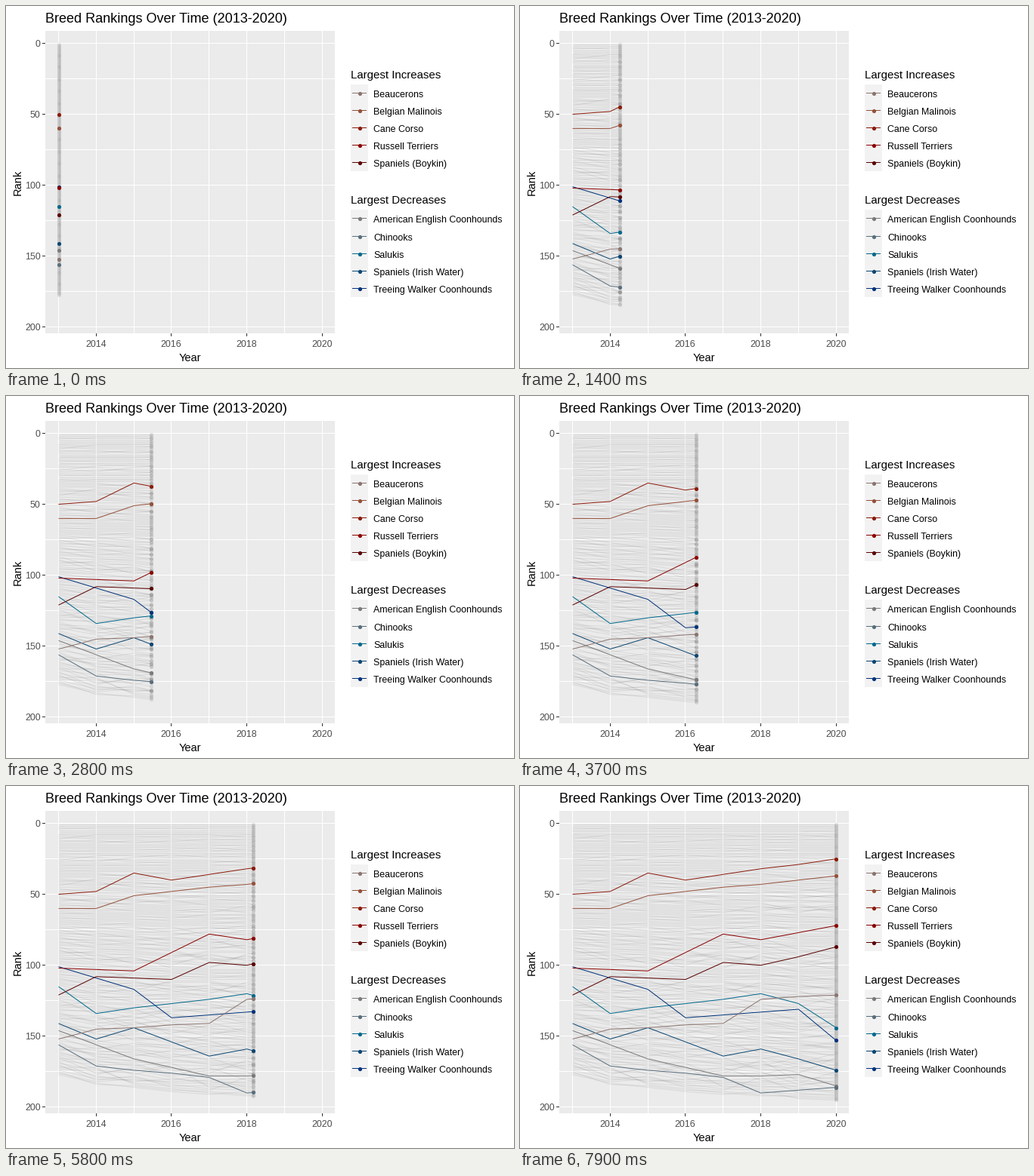
A matplotlib script that plays this animation: 672 by 480 pixels, repeating every 10 s.

```python
import numpy as np
import matplotlib.pyplot as plt
from matplotlib.animation import FuncAnimation
from matplotlib.collections import LineCollection
from matplotlib.patches import Rectangle

W, H, DPI = 672, 480, 96
PX = 72 / DPI  # points per pixel
plt.rcParams["font.family"] = "Liberation Sans"

YEARS = np.arange(2013, 2021)
SPAN = np.linspace(0, 1, len(YEARS))
YEAR_FRAMES = np.rint(79 * SPAN)  # each year is reached on a whole frame
BREED_COUNTS = np.rint(177 + 18 * np.sqrt(SPAN)).astype(int)

# Colour and turning points (two-digit year: rank) of each highlighted breed
INCREASES = {
    "Beaucerons": ("#8B7570", {13: 152, 14: 145, 17: 141, 18: 124, 20: 121}),
    "Belgian Malinois": ("#94503A", {13: 60, 14: 60, 15: 51, 20: 37}),
    "Cane Corso": ("#8B1A0A", {13: 50, 14: 48, 15: 35, 16: 40, 20: 25}),
    "Russell Terriers": ("#8B0000", {13: 102, 15: 104, 17: 78, 18: 82, 20: 72}),
    "Spaniels (Boykin)": ("#5A0000", {13: 121, 14: 108, 16: 110, 17: 98, 18: 100, 20: 87}),
}
DECREASES = {
    "American English Coonhounds": ("#7A7A7A", {13: 146, 15: 166, 17: 178, 19: 177, 20: 185}),
    "Chinooks": ("#5A6E7C", {13: 156, 14: 171, 17: 179, 18: 190, 20: 186}),
    "Salukis": ("#00688B", {13: 115, 14: 134, 18: 120, 19: 127, 20: 144}),
    "Spaniels (Irish Water)": ("#0A4672", {13: 141, 14: 152, 15: 144, 17: 164, 18: 159, 20: 174}),
    "Treeing Walker Coonhounds": ("#00327A", {13: 101, 15: 117, 16: 137, 19: 131, 20: 153}),
}
SERIES = list(DECREASES.values()) + list(INCREASES.values())
NAMED = np.rint([np.interp(YEARS - 2000, list(turns), list(turns.values()))
                 for _, turns in SERIES])


def x_px(year):
    return 69.5 + 49.83 * (np.asarray(year) - 2013)


def y_px(rank):
    return 49.5 + 1.882 * np.asarray(rank)


def pixel_centre(value):
    return np.floor(value) + 0.5


def background_ranks():
    """Rank every other breed by a drifting score, around the named ones."""
    rng = np.random.default_rng(7)
    total = BREED_COUNTS[-1] - len(NAMED)
    base = np.arange(total)
    added = np.diff(BREED_COUNTS)
    first = np.zeros(total, int)
    late = rng.choice(np.arange(30, total), added.sum(), replace=False)
    first[late] = np.repeat(np.arange(1, len(YEARS)), added)
    steps = rng.normal(size=(total, len(YEARS))) * (0.4 + 0.019 * base)[:, None]
    scores = base[:, None] + np.cumsum(steps, axis=1)
    ranks = np.full(scores.shape, np.nan)
    for col, count in enumerate(BREED_COUNTS):
        free = np.setdiff1d(np.arange(1, count + 1), NAMED[:, col])
        active = np.flatnonzero(first <= col)
        order = active[np.argsort(scores[active, col])]
        ranks[order, col] = free[:len(order)]
    return ranks


OTHERS = background_ranks()

fig = plt.figure(figsize=(W / DPI, H / DPI), dpi=DPI, facecolor="white")
ax = fig.add_axes([0, 0, 1, 1])
ax.set(xlim=(0, W), ylim=(H, 0))
ax.axis("off")


def rect(x, y, w, h, color):
    ax.add_patch(Rectangle((x, y), w, h, fc=color, lw=0, zorder=0))


def line(xs, ys, color, zorder=1):
    return ax.plot(xs, ys, color=color, lw=PX, snap=False,
                   solid_capstyle="butt", zorder=zorder)[0]


def dots(xs, ys, color, zorder, alpha=None):
    return ax.plot(xs, ys, "o", color=color, ms=5.2 * PX, mew=0, snap=False,
                   alpha=alpha, zorder=zorder)[0]


def label(x, y, text, size, color="black", **kw):
    ax.text(x, y, text, fontsize=size * PX, color=color,
            **{"va": "baseline", "ha": "left", **kw})


def draw_axes():
    left, top, right, bottom = 52, 33, 435, 434
    rect(left, top, right - left, bottom - top, "#EBEBEB")
    for year in YEARS:
        x = pixel_centre(x_px(year))
        line([x, x], [top, bottom], "white")
        if year % 2 == 0:
            line([x, x], [bottom, bottom + 4], "#333333")
            label(x, 452, str(year), 12.4, "#4D4D4D", ha="center")
    for rank in range(0, 201, 25):
        y = pixel_centre(y_px(rank))
        line([left, right], [y, y], "white")
        if rank % 50 == 0:
            line([left - 4, left], [y, y], "#333333")
            label(45.5, y + 4.5, str(rank), 12.4, "#4D4D4D", ha="right")
    label(52, 22, "Breed Rankings Over Time (2013-2020)", 18)
    label(243, 471, "Year", 14.6, ha="center")
    label(20, 234, "Rank", 14.6, ha="center", rotation=90, rotation_mode="anchor")


def draw_legend(title, entries, top):
    row = 23.04
    label(456, top - 8, title, 15)
    rect(456, top, row, row * len(entries), "#F2F2F2")
    for i, (name, (color, _)) in enumerate(entries.items()):
        y = pixel_centre(top + row * (i + 0.5))
        line([458, 477], [y, y], color)
        dots([467.5], [y], color, 2)
        label(486, y + 5.5, name, 12.4)


draw_axes()
draw_legend("Largest Increases", INCREASES, 104.28)
draw_legend("Largest Decreases", DECREASES, 270.46)

faint_lines = LineCollection([], colors="#7F7F7F", alpha=0.17, linewidths=PX, zorder=2)
ax.add_collection(faint_lines)
faint_dots = dots([], [], "#7F7F7F", 4, alpha=0.2)
named_lines = [line([], [], color, 3) for color, _ in SERIES]
named_dots = [dots([], [], color, 5) for color, _ in SERIES]


def ranks_until(ranks, now):
    """Ranks of all past years, closed by the interpolated current rank."""
    past = int(np.ceil(now - YEARS[0]))
    if past == 0:
        return ranks[:, :1]
    part = now - YEARS[past - 1]
    head = ranks[:, past] if part == 1 else (
        ranks[:, past - 1] * (1 - part) + ranks[:, past] * part)
    return np.column_stack([ranks[:, :past], head])


def update(frame):
    now = np.interp(frame, YEAR_FRAMES, YEARS)  # rests on the last year
    xs = x_px(np.append(YEARS[YEARS < now], now))
    others = y_px(ranks_until(OTHERS, now))
    faint_lines.set_segments([np.column_stack([xs, ys]) for ys in others]
                             if len(xs) > 1 else [])
    faint_dots.set_data(np.full(len(others), xs[-1]), others[:, -1])
    for path, dot, ys in zip(named_lines, named_dots, y_px(ranks_until(NAMED, now))):
        path.set_data(xs, ys)
        dot.set_data(xs[-1:], ys[-1:])
    return [faint_lines, faint_dots, *named_lines, *named_dots]


anim = FuncAnimation(fig, update, frames=100, interval=100, repeat=True,
                     repeat_delay=0, blit=False)
plt.show()
```
